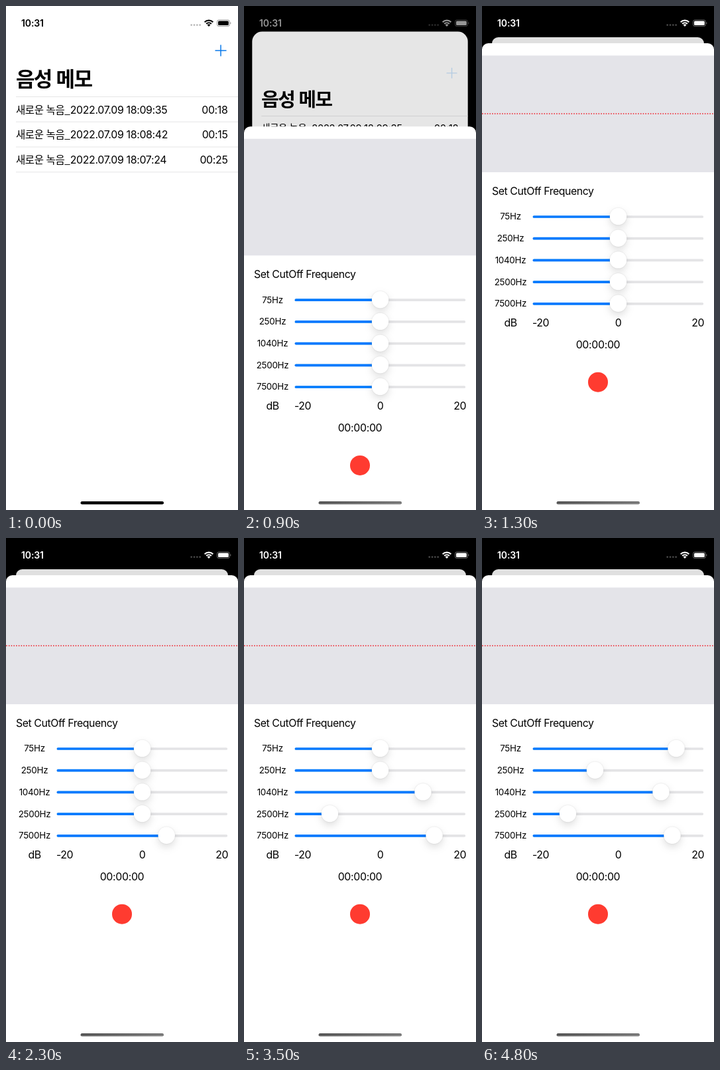
An HTML page for the animation above (5000 ms loop, 350 px wide and 758 px high).

```html
<!DOCTYPE html>
<html lang="ko">
<head>
<meta charset="utf-8">
<title>Voice memo</title>
<style>
  html, body { margin: 0; width: 100%; height: 100%; overflow: hidden; background: #000; }
  svg { display: block; width: 350px; height: 758px; }
  text { font: 400 15.87px Inter, "Liberation Sans", sans-serif; letter-spacing: -.027em; }
  .mid { text-anchor: middle; }
  .end { text-anchor: end; }
  .num { letter-spacing: -.02em; }
  .hz { font-size: 13.4px; letter-spacing: -.02em; text-anchor: middle; }
  .ko { font-family: "Noto Sans CJK KR", "Noto Sans CJK", sans-serif; font-size: 15.5px; letter-spacing: -.025em; }
  .title { font-size: 31px; font-weight: 700; letter-spacing: -.055em; }
  .clock { font-size: 14px; font-weight: 600; letter-spacing: -.01em; }
  .knob { fill: #fff; filter: drop-shadow(0 .5px 1px rgba(0,0,0,.12)) drop-shadow(0 5px 6px rgba(0,0,0,.13)); }
</style>
</head>
<body>
<svg id="stage" viewBox="0 0 350 758" xmlns="http://www.w3.org/2000/svg">
  <defs>
    <linearGradient id="bar" x1="0" y1="0" x2="1" y2="1">
      <stop offset="0" stop-color="#484848"/>
      <stop offset="1" stop-color="#8e8e8e"/>
    </linearGradient>
  </defs>
  <rect width="350" height="758"/>

  <g id="card">
    <rect class="face" width="350" height="758" fill="#fff"/>
    <path id="plus" d="M316 67h16M324 59v16" stroke="#0a7aea" stroke-width="1.5" stroke-linecap="round"/>
    <text class="ko title" x="15" y="121">음성 메모</text>
    <g id="memos"></g>
    <rect id="dim" class="face" width="350" height="758"/>
  </g>

  <g id="sheet">
    <path id="panel" fill="#fff"/>
    <rect y="18.5" width="350" height="175.5" fill="#e4e4e9"/>
    <path id="wave" d="M1 106H350" stroke="#ee3e48" stroke-width="1.9" stroke-linecap="round" stroke-dasharray="0 3.73"/>
    <text x="15" y="228">Set CutOff Frequency</text>
    <g id="sliders"></g>
    <text class="mid" x="43" y="425.5">dB</text>
    <text x="76" y="425.5">-20</text>
    <text class="mid" x="205.5" y="425.5">0</text>
    <text class="end" x="335" y="425.5">20</text>
    <text class="mid num" x="175" y="459">00:00:00</text>
    <circle cx="175" cy="509.7" r="15" fill="#ff3b30"/>
  </g>

  <g id="status">
    <text class="clock" x="23" y="30.6">10:31</text>
    <path d="M279.7 28.6h13" stroke="currentColor" stroke-width="2.9" stroke-linecap="round" stroke-dasharray="0 4.3" opacity=".28"/>
    <g fill="none" stroke="currentColor">
      <path d="M299.66 24.2A9.3 9.3 0 0 1 312.34 24.2" stroke-width="2.2"/>
      <path d="M302.1 26.83A5.7 5.7 0 0 1 309.9 26.83" stroke-width="2"/>
      <path d="M306 31L303.55 28.37A3.6 3.6 0 0 1 308.45 28.37Z" fill="currentColor" stroke="none"/>
      <rect x="318.5" y="21" width="18.8" height="9.6" rx="2.8" opacity=".4"/>
    </g>
    <rect x="320" y="22.5" width="15.8" height="6.6" rx="1.5"/>
    <path d="M338.4 24.3a1.6 1.6 0 0 1 0 3z" opacity=".45"/>
  </g>
  <rect id="home" x="112.5" y="745" width="125.5" height="4.6" rx="2.3"/>
</svg>

<script>
const LOOP = 5000, TICK = 100, OPEN = 800, SETTLED = 1300;
const TOP = 56, H = 758, ZERO = 205.5;
const $ = id => document.getElementById(id);
const lerp = (a, b, k) => a + (b - a) * k;
const set = (el, attrs) => { for (const k in attrs) el.setAttribute(k, attrs[k]); };

const memos = [['18:09:35', '00:18'], ['18:08:42', '00:15'], ['18:07:24', '00:25']];
const rule = y => `<path d="M15 ${y}H350" stroke="#e2e2e4" stroke-width=".9"/>`;
$('memos').innerHTML = rule(136.5) + memos.map(([time, length], i) => {
  const y = 161.5 + i * 37.75;
  return `<text class="ko" x="15" y="${y}">새로운 녹음_</text>
    <text class="num" x="96.7" y="${y}">2022.07.09 ${time}</text>
    <text class="end num" x="334.5" y="${y}">${length}</text>` + rule(174.25 + i * 37.75);
}).join('');

// Each drag: start time, final knob x, share of the way covered at each tick
const slow = [.12, .45, .85, 1], quick = [.25, .75, 1];
const sliders = [
  { hz: 75, at: 4500, to: 293, steps: slow },
  { hz: 250, at: 4000, to: 170.5, steps: quick },
  { hz: 1040, at: 3300, to: 270, steps: quick },
  { hz: 2500, at: 2800, to: 129.5, steps: quick },
  { hz: 7500, at: 2200, to: 287, steps: slow }
];
const rowY = i => 261 + i * 32.7;
$('sliders').innerHTML = sliders.map((s, i) => {
  const y = rowY(i);
  return `<text class="hz" x="43" y="${y + 4.4}">${s.hz}Hz</text>
    <g stroke-width="3.7" stroke-linecap="round">
      <path d="M78.4 ${y}H332.3" stroke="#e4e4e6"/>
      <path class="fill" stroke="#007aff"/>
    </g>
    <circle class="knob" cy="${y - .5}" r="12.7"/>`;
}).join('');
const fills = document.querySelectorAll('.fill');
const knobs = document.querySelectorAll('.knob');
const faces = document.querySelectorAll('.face');

function knobX({ at, to, steps }, t) {
  const n = Math.floor((t - at) / TICK);
  return n < 0 ? ZERO : lerp(ZERO, to, steps[Math.min(n, steps.length - 1)]);
}

// Critically damped spring for the rising sheet
function rise(t) {
  if (t < OPEN) return 0;
  if (t >= SETTLED) return 1;
  const a = .346 + 28 * (t - OPEN) / 1000;
  return 1 - (1 + a) * Math.exp(-a);
}

function panelPath(h, r, b) {
  return `M0 ${r}A${r} ${r} 0 0 1 ${r} 0H${350 - r}A${r} ${r} 0 0 1 350 ${r}` +
    `V${h - b}A${b} ${b} 0 0 1 ${350 - b} ${h}H${b}A${b} ${b} 0 0 1 0 ${h - b}Z`;
}

function statusColor(t) {
  const shade = t < 900 ? 0 : t < 1000 ? 150 : t < 1100 ? 226 : 255;
  return `rgb(${shade},${shade},${shade})`;
}

function draw(time) {
  const t = Math.floor(time % LOOP / TICK) * TICK;
  const p = rise(t), open = t >= OPEN;

  set($('card'), { transform: `translate(${15 * p} ${47 * p}) scale(${1 - 30 / 350 * p})` });
  faces.forEach(f => set(f, { rx: open ? lerp(42, 10.5, p) : 0 }));
  set($('dim'), { opacity: .12 * p });
  set($('plus'), { opacity: open ? .22 : 1 });

  set($('sheet'), {
    transform: `translate(0 ${lerp(H, TOP, p)})`,
    visibility: open ? 'visible' : 'hidden'
  });
  set($('panel'), { d: panelPath(H - TOP, 9.5, t < SETTLED ? 44 : 0) });
  set($('wave'), { opacity: t < SETTLED ? 0 : 1 });

  sliders.forEach((s, i) => {
    const x = knobX(s, t);
    set(fills[i], { d: `M78.4 ${rowY(i)}H${x}` });
    set(knobs[i], { cx: x });
  });

  const ink = statusColor(t);
  set($('status'), { fill: ink, color: ink });
  set($('home'), { fill: open ? 'url(#bar)' : '#000' });
}

const start = performance.now();
function frame() {
  draw(performance.now() - start);
  requestAnimationFrame(frame);
}
frame();
</script>
</body>
</html>
```
